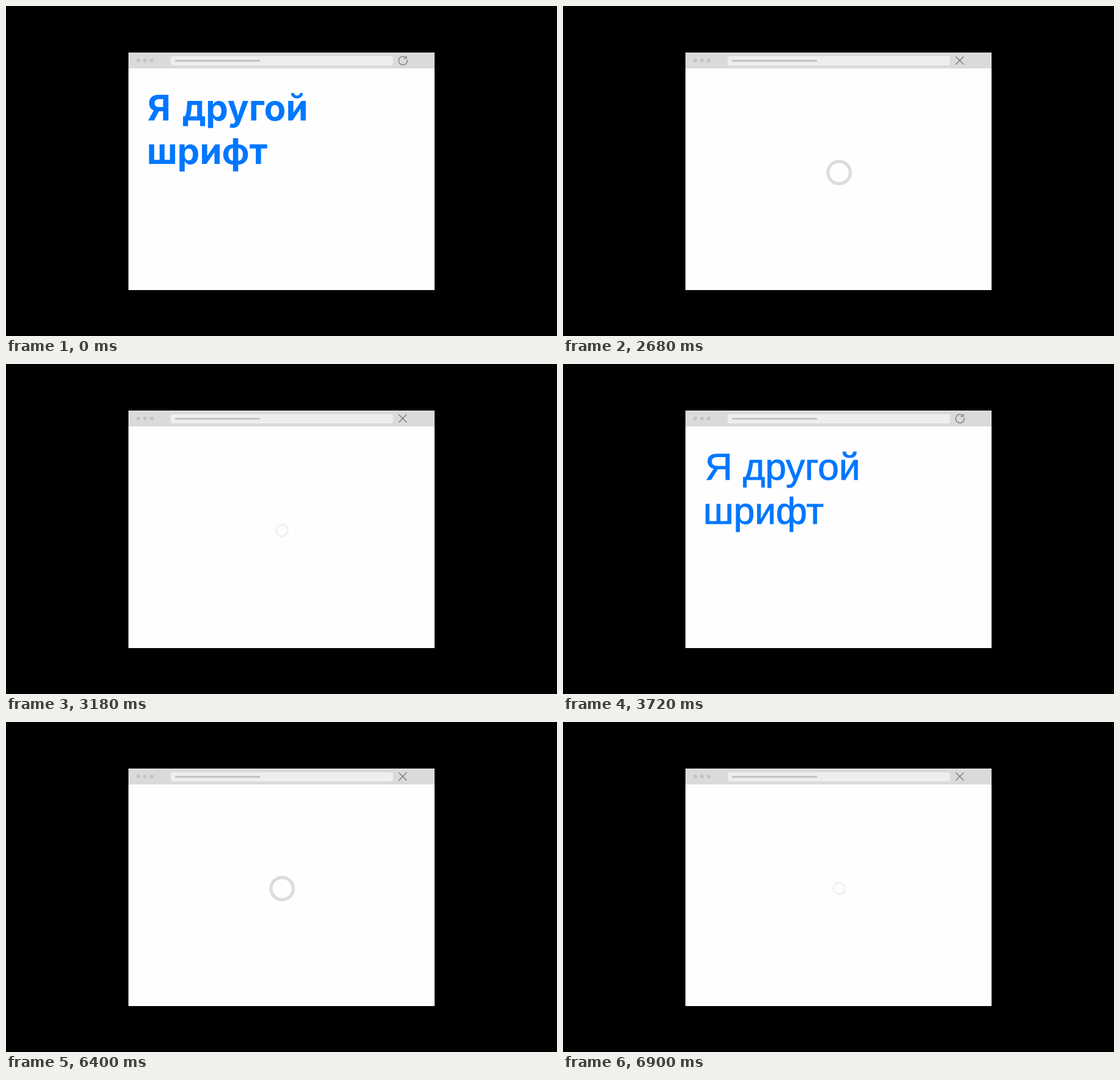
An HTML page with a canvas that plays this animation: 900 px wide and 539 px high, repeating every 7.44 s.

```html
<!DOCTYPE html>
<html lang="ru">
<head>
<meta charset="utf-8">
<style>
  html, body { margin: 0; width: 100%; height: 100%; overflow: hidden; background: #000; }
  canvas { display: block; }
</style>
</head>
<body>
<canvas id="stage" width="900" height="539"></canvas>
<script>
const ctx = document.getElementById('stage').getContext('2d');
const TAU = Math.PI * 2;
const BLUE = '#07f';
const HALF_LOOP = 3720;
const READ_TIME = 2000;
const LOADER_START = 2520;
const LOADER_LAST = 660;

const clamp = v => Math.min(1, Math.max(0, v));
const span = (t, from, to) => clamp((t - from) / (to - from));
const backIn = p => p * p * (2.70158 * p - 1.70158);
const backOut = p => 1 - backIn(1 - p);

function rect(x, y, w, h, color, radius = 0) {
  ctx.fillStyle = color;
  ctx.beginPath();
  ctx.roundRect(x, y, w, h, radius);
  ctx.fill();
}

function strokeLines(color, width, ...lines) {
  ctx.strokeStyle = color;
  ctx.lineWidth = width;
  ctx.beginPath();
  for (const [start, ...rest] of lines) {
    ctx.moveTo(...start);
    rest.forEach(point => ctx.lineTo(...point));
  }
  ctx.stroke();
}

function drawBrowser() {
  rect(0, 0, 900, 539, '#000');
  rect(200, 76, 500, 388, '#fefefe');
  rect(200, 76, 500, 26, '#dadada');
  for (let i = 0; i < 3; i++) rect(213 + i * 11, 86, 6, 6, '#c3c3c3', 3);
  rect(269, 82, 363, 15, '#eee', 3);
  rect(276, 88, 139, 3, '#c3c3c3');
}

function drawReload() {
  ctx.strokeStyle = '#777';
  ctx.lineWidth = 1.3;
  ctx.beginPath();
  ctx.arc(648.5, 89.3, 7, -0.2, TAU - 0.85);
  ctx.stroke();
  strokeLines('#777', 1.3, [[654, 81.5], [654, 85.6], [649.8, 85.6]]);
}

function drawStop() {
  strokeLines('#777', 1.4, [[641.5, 82.5], [654.5, 95.5]], [[654.5, 82.5], [641.5, 95.5]]);
}

function drawCustomFont() {
  ctx.fillStyle = BLUE;
  ctx.font = '700 58px Inter, sans-serif';
  ctx.fillText('Я', 231, 187);
  ctx.fillText('другой', 288, 187);
  ctx.fillText('шрифт', 230, 258);
}

function drawFallbackFont() {
  ctx.fillStyle = ctx.strokeStyle = BLUE;
  ctx.lineWidth = 1;
  ctx.font = '62px "Liberation Sans", Arial, sans-serif';
  for (const [text, x, y] of [['Я другой', 232, 189], ['шрифт', 229, 261]]) {
    ctx.fillText(text, x, y);
    ctx.strokeText(text, x, y);
  }
}

function ring(color) {
  ctx.strokeStyle = color;
  ctx.lineWidth = 5;
  ctx.beginPath();
  ctx.arc(0, 0, 17.5, 0, TAU);
  ctx.stroke();
}

// The right half is revealed downwards, then the left half upwards.
function drawLoader(time) {
  const t = Math.min(time, LOADER_LAST);
  const leave = span(t, 480, 689);
  const scale = backOut(span(t, -10, 200)) * (1 - backIn(leave));
  const right = 44 * span(t, 180, 340);
  const left = 40 * span(t, 340, 494);

  ctx.save();
  ctx.translate(451, 272);
  ctx.scale(scale, scale);
  ctx.globalAlpha = span(t, -10, 150) * clamp(1 - leave * 1.04);
  ring('#dcdcdc');
  ctx.beginPath();
  ctx.rect(-2, -22, 24, right);
  if (left > 0) ctx.rect(-22, 20 - left, 20, left + 2);
  ctx.clip();
  ring('#949494');
  ctx.restore();
}

function draw(now) {
  const time = now % (HALF_LOOP * 2);
  const t = time % HALF_LOOP;
  drawBrowser();
  if (t < READ_TIME) {
    drawReload();
    if (time < HALF_LOOP) drawCustomFont();
    else drawFallbackFont();
  } else {
    drawStop();
    if (t >= LOADER_START) drawLoader(t - LOADER_START);
  }
}

const start = performance.now();
function tick() {
  draw(performance.now() - start);
  requestAnimationFrame(tick);
}
tick();
</script>
</body>
</html>
```
